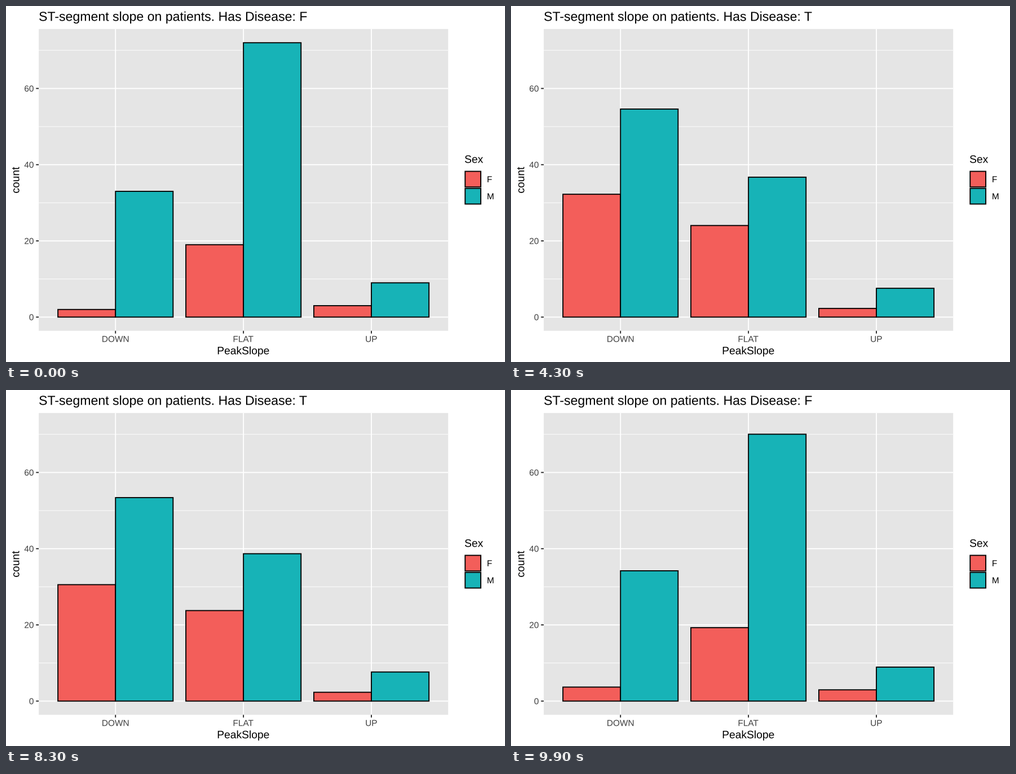
These frames come from a looping animation (885x632 px, 10000 ms). A matplotlib script:

```python
import numpy as np
import matplotlib.pyplot as plt
from matplotlib.animation import FuncAnimation
from matplotlib.patches import PathPatch, Rectangle
from matplotlib.textpath import TextPath
from matplotlib.transforms import Affine2D

W, H, DPI = 885, 632, 100
PX = 72 / DPI                      # one pixel in points
LEFT, RIGHT, TOP, BOTTOM = 58.05, 784.2, 40.85, 576.65
STEP = (RIGHT - LEFT) / 3.2        # distance between categories
ZERO, UNIT = 552.3, 6.765          # y of count 0, pixels per count
LINE = 1.87
RED, TEAL = "#F35E5A", "#17B3B7"
PANEL, TICK, LABEL = "#E5E5E5", "#262626", "#404040"
SMALL, MEDIUM, LARGE = 15.4, 19.25, 23.1

CATEGORIES = ["DOWN", "FLAT", "UP"]
HEALTHY = np.array([2, 33, 19, 72, 3, 9])
DISEASED = np.array([44, 63, 26, 23, 2, 7])
TITLE = "ST-segment slope on patients. Has Disease: "

plt.rcParams["font.family"] = "Liberation Sans"
plt.rcParams["path.snap"] = False

fig = plt.figure(figsize=(W / DPI, H / DPI), dpi=DPI, facecolor="white")
ax = fig.add_axes([0, 0, 1, 1])
ax.set_xlim(0, W)
ax.set_ylim(H, 0)
ax.axis("off")


def cat_x(i):
    return LEFT + (0.6 + i) * STEP


def count_y(n):
    return ZERO - n * UNIT


def rect(x, y, w, h, fill, edge="none", z=1):
    box = Rectangle((x, y), w, h, facecolor=fill, edgecolor=edge,
                    linewidth=LINE * PX if edge != "none" else 0,
                    joinstyle="miter", zorder=z)
    return ax.add_patch(box)


def line(x0, y0, x1, y1, color, width=LINE, z=2):
    ax.plot([x0, x1], [y0, y1], color=color, lw=width * PX,
            solid_capstyle="butt", zorder=z)


def text(x, y, s, size, color="black", align="left", angle=0):
    """Place text on its baseline at (x, y)."""
    path = TextPath((0, 0), s, size=size)
    box = path.get_extents()
    shift = {"left": 0, "center": -(box.x0 + box.x1) / 2, "right": -box.x1}
    place = (Affine2D().translate(shift[align], 0).scale(1, -1)
             .rotate_deg(-angle).translate(x, y))
    return ax.add_patch(PathPatch(place.transform_path(path), facecolor=color,
                                  linewidth=0, zorder=5))


# Panel, grid and axes
rect(LEFT, TOP, RIGHT - LEFT, BOTTOM - TOP, PANEL)
for n in (10, 30, 50, 70):
    line(LEFT, count_y(n), RIGHT, count_y(n), "white", LINE / 2)
for n in (0, 20, 40, 60):
    y = count_y(n)
    line(LEFT, y, RIGHT, y, "white")
    line(LEFT - 4.8, y, LEFT, y, TICK)
    text(48.8, y + 5.5, str(n), SMALL, LABEL, "right")
for i, name in enumerate(CATEGORIES):
    x = cat_x(i)
    line(x, TOP, x, BOTTOM, "white")
    line(x, BOTTOM, x, BOTTOM + 4.8, TICK)
    text(x, 596.4, name, SMALL, LABEL, "center")
text((LEFT + RIGHT) / 2, 618.3, "PeakSlope", MEDIUM, align="center")
text(23.4, (TOP + BOTTOM) / 2, "count", MEDIUM, align="center", angle=90)

# Legend
text(813.1, 278.5, "Sex", MEDIUM)
for i, (name, fill) in enumerate((("F", RED), ("M", TEAL))):
    y = 292.3 + 30.24 * i
    rect(813.06, y, 30.24, 30.24, "#F0F0F0")
    rect(814.3, y + 1.24, 27.76, 27.76, fill, "black", z=3)
    text(852.9, y + 20.6, name, SMALL)

# Bars and title
bar_w = 0.45 * STEP
bars = [rect(cat_x(i // 2) - bar_w * (1 - i % 2), ZERO, bar_w, 0,
             (RED, TEAL)[i % 2], "black", z=3) for i in range(6)]
titles = [text(LEFT, 26.4, TITLE + flag, LARGE) for flag in "FT"]


def update(frame):
    rise = np.clip((frame - 25) / 25, 0, 1)
    fall = np.clip((frame - 75) / 25, 0, 1)
    mix = rise - fall
    for bar, n in zip(bars, HEALTHY + (DISEASED - HEALTHY) * mix):
        bar.set_height(-n * UNIT)
    titles[0].set_visible(mix <= 0.5)
    titles[1].set_visible(mix > 0.5)
    return bars + titles


anim = FuncAnimation(fig, update, frames=100, interval=100,
                     init_func=lambda: update(0), repeat=True, repeat_delay=0)
plt.show()
```
